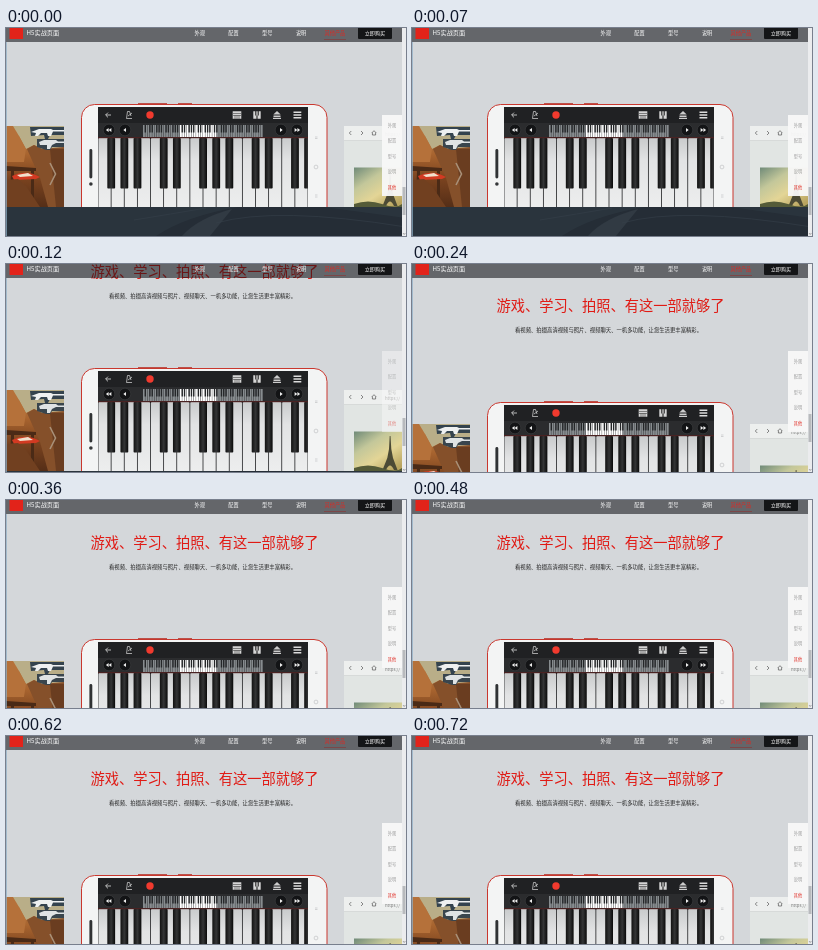
These frames come from a looping animation (400 by 208 pixels, 840 ms). An HTML page:

```html
<!DOCTYPE html>
<html>
<head>
<meta charset="utf-8">
<title>H5</title>
<style>
  html, body { margin: 0; width: 100%; height: 100%; overflow: hidden; background: #d4d7da; }
  svg { display: block; width: 100vw; height: 100vh; }
  text { font-family: "Noto Sans CJK SC", "Noto Sans CJK", "Noto Sans CJK JP", sans-serif; }
  .page, .copy, .thumb, .menu { animation: .84s step-end infinite; }
  .page { animation-name: scroll; }
  .copy { animation-name: appear; }
  .thumb { animation-name: thumb; }
  .menu { animation-name: fade; }
  @keyframes scroll {
    0% { transform: translateY(0); }
    14.286% { transform: translateY(28px); }
    28.571% { transform: translateY(62px); }
    42.857%, 100% { transform: translateY(63px); }
  }
  @keyframes appear {
    0% { opacity: 0; }
    14.286%, 100% { opacity: 1; }
  }
  @keyframes thumb {
    0% { transform: translateY(9px); }
    14.286% { transform: translateY(4px); }
    28.571%, 100% { transform: translateY(0); }
  }
  @keyframes fade {
    0% { opacity: .95; }
    14.286% { opacity: .5; }
    28.571%, 100% { opacity: .95; }
  }
</style>
</head>
<body>
<svg viewBox="0 0 400 208" preserveAspectRatio="none">
  <defs>
    <linearGradient id="town" x2="0" y2="1">
      <stop stop-color="#b98a55"/><stop offset=".35" stop-color="#a8642f"/>
      <stop offset=".65" stop-color="#7a431f"/><stop offset="1" stop-color="#552e17"/>
    </linearGradient>
    <linearGradient id="sky" x2=".8" y2="1">
      <stop stop-color="#6f8a78"/><stop offset=".35" stop-color="#c3c79a"/>
      <stop offset=".65" stop-color="#e3d596"/><stop offset="1" stop-color="#b9a45f"/>
    </linearGradient>
    <linearGradient id="ivory" x2="0" y2="1">
      <stop stop-color="#c9cbcc"/><stop offset=".3" stop-color="#e2e3e4"/><stop offset="1" stop-color="#eeefef"/>
    </linearGradient>
    <linearGradient id="ebony">
      <stop stop-color="#111"/><stop offset=".5" stop-color="#343536"/><stop offset="1" stop-color="#090909"/>
    </linearGradient>
    <clipPath id="screen"><rect x="92" y="79" width="210" height="100"/></clipPath>
  </defs>

  <rect width="400" height="208" fill="#d4d7da"/>

  <g class="page">
    <g class="copy">
      <text x="84.5" y="-14.7" font-size="14.25" fill="#e01a14">游戏、学习、拍照、有这一部就够了</text>
      <text x="103" y="6" font-size="5.35" fill="#222">看视频、拍摄高清视频与照片、视频聊天、一机多功能，让您生活更丰富精彩。</text>
    </g>

    <!-- game screenshot -->
    <g>
      <rect y="98" width="58" height="81" fill="url(#town)"/>
      <path d="M7 98H58V121H36L28 117 20 121 13 108 7 105Z" fill="#b9ae88"/>
      <path d="M0 98H7L13 108 20 121 18 134H0Z" fill="#b5713a"/>
      <path d="M21 121 28 117 36 121 58 119V179H42L34 150Z" fill="#85502a"/>
      <path d="M44 121H58V179H50Z" fill="#6a3d20"/>
      <path d="M0 138 30 140V143H0ZM5 143H8V172H4ZM25 143H28V179H25Z" fill="#4a2a16"/>
      <path d="M6 148Q20 141 34 149L30 151 8 152Z" fill="#d23a22"/>
      <path d="M11 147 22 145 27 148 14 149Z" fill="#f0e0cc"/>
      <path d="M0 152 12 151 20 158 34 179H0Z" fill="#714020"/>
      <path d="M24 99H58V107H44L42 111H39L38 107 25 108Z" fill="#34434e"/>
      <path d="M25 104 33 101H45L47 102H58V103.5H47L45 108H42L41 105H35L32 108H29L30 105Z" fill="#eef0f0"/>
      <path d="M31 111H58V119H46L44 122H40L31 119Z" fill="#39454d"/>
      <path d="M33 114 38 112H50L52 113.5H58V115H50L46 117 44 121H41V117H34Z" fill="#dfe3e4"/>
      <path d="M44 135 49.5 146 44 157" fill="none" stroke="#a89078" stroke-width="1.6"/>
    </g>

    <!-- browser screenshot -->
    <g>
      <rect x="338" y="98" width="58" height="81" fill="#e1e5e3"/>
      <rect x="338" y="98" width="58" height="14" fill="#edefee"/>
      <path d="M338 112.5H396" stroke="#d0d4d4" stroke-width=".6"/>
      <path d="M345.3 103 343.3 105 345.3 107M355 103 357 105 355 107M365.7 105 368 102.7 370.3 105M366.4 104.7V107H369.6V104.7" fill="none" stroke="#555" stroke-width=".7"/>
      <text x="379" y="107.5" font-size="4.3" fill="#777">https://</text>
      <rect x="348" y="139.5" width="48" height="40" fill="url(#sky)"/>
      <path d="M383.7 144H384.5L385.3 157 387 166 391.5 178H388Q384 169 380 178H376.5L381.3 166 383 157Z" fill="#4c4a35"/>
      <path d="M348 176Q362 171 376 176T396 176V179H348Z" fill="#555b38"/>
    </g>

    <!-- phone -->
    <rect x="75.5" y="76.5" width="245.5" height="130" rx="13" fill="#f3f4f4" stroke="#c9372e"/>
    <path d="M132 75.7H161M172 75.7H186" stroke="#b73128"/>
    <rect x="83.4" y="121" width="2.9" height="29.5" rx="1.4" fill="#303234"/>
    <circle cx="84.9" cy="156" r="1.8" fill="#343638"/>
    <g fill="none" stroke="#b9bbbc" stroke-width=".6">
      <path d="M309 109H311.5M309 110.5H311.5M309 167H311.5M309 169H311.5"/><circle cx="310" cy="139" r="1.9"/>
    </g>

    <g clip-path="url(#screen)">
      <rect x="92" y="79" width="210" height="100" fill="#202123"/>
      <rect x="92" y="95" width="210" height="14" fill="#2b2c2e"/>
      <g fill="none" stroke="#ddd" stroke-width=".8">
        <path d="M105 87H99.8M102 84.6 99.6 87 102 89.4"/>
        <path d="M121.5 83.5H123.5L125 88M121.5 83.5 120.5 90.5H126M122 88 126 85" stroke-width=".7"/>
        <path d="M287.5 84.2H295.3M287.5 87H295.3M287.5 89.8H295.3" stroke-width="1.4"/>
      </g>
      <path d="M267.3 86.5 271 83 274.7 86.5ZM267.5 87.5H274.5V89H267.5ZM267 89.8H275V91H267Z" fill="#ccc"/>
      <circle cx="144" cy="87" r="3.7" fill="#f13a2e"/>
      <path d="M226.7 83.3H235.3V90.7H226.7ZM247.3 83.3H254.7V90.7H247.3Z" fill="#d5d5d5"/>
      <path d="M227 85.5H235M227 87.5H235M229 87V91M231 87V91M233 87V91" stroke="#444" stroke-width=".6"/>
      <path d="M249.8 83V87.5M252.2 83V87.5M251 87.5V91" stroke="#222" stroke-width="1.1"/>
      <g id="buttons"></g>
      <g id="overview"></g>
      <g id="keys"></g>
      <rect x="92" y="109" width="210" height="1.2" fill="#4a2222"/>
    </g>

    <!-- next section -->
    <g>
      <rect y="179" width="400" height="62" fill="#2a343d"/>
      <path d="M150 208Q180 188 232 179H318L400 190V208Z" fill="#252d36"/>
      <path d="M176 208Q192 190 226 181L204 208Z" fill="#313a43"/>
      <path d="M128 192Q165 186 200 180M210 195Q270 178 400 199" fill="none" stroke="#37414a" stroke-width=".6"/>
    </g>
  </g>

  <rect width="400" height="14" fill="#14161a" opacity=".58"/>
  <rect x="3.5" width="13.5" height="11" fill="#e2231a"/>
  <text x="20.5" y="7.3" font-size="6.2" font-weight="500" fill="#fff">H5实战页面</text>
  <g id="nav" font-size="5.2" font-weight="500" fill="#fff"></g>
  <path d="M318 11.5H340" stroke="#8e3331" stroke-width=".6"/>
  <rect x="352" y="-2" width="34" height="13" rx="1" fill="#141517"/>
  <text x="358.7" y="7" font-size="5.1" font-weight="500" fill="#fff">立即购买</text>

  <g class="menu">
    <rect x="376" y="87" width="20" height="81" fill="#f8f8f8"/>
    <g id="side" font-size="4.2" fill="#999"></g>
  </g>

  <rect x="396" width="4" height="208" fill="#ebecee"/>
  <rect class="thumb" x="396.5" y="150" width="3" height="28" fill="#b8babd"/>
  <path d="M397 205 398.2 206.5 399.4 205" fill="none" stroke="#777" stroke-width=".6"/>
  <path d="M.4 14V208" stroke="#8fb0c8" stroke-width=".8"/>
</svg>
<script>
  const fill = (id, markup) => { document.getElementById(id).innerHTML = markup; };
  const times = (n, draw) => Array.from({ length: n }, (_, i) => draw(i)).join('');
  const rect = (x, y, w, h, color, extra = '') =>
    `<rect x="${x}" y="${y}" width="${w}" height="${h}" fill="${color}" ${extra}/>`;
  const label = (x, y, text, color = '') =>
    `<text x="${x}" y="${y}" ${color && `fill="${color}"`}>${text}</text>`;

  // White keys that have a black key on their right, counted from C.
  const hasSharp = i => [0, 1, 3, 4, 5].includes(i % 7);

  const pitch = 210 / 16;
  fill('keys',
    times(16, i => rect(92.4 + i * pitch, 110, pitch - .8, 75, 'url(#ivory)', 'rx="1"')) +
    times(16, i => hasSharp(i + 3)
      ? rect(92 + (i + 1) * pitch - 3.8, 110, 7.8, 50.5, 'url(#ebony)', 'rx=".8"') : ''));

  const small = 120 / 52;
  fill('overview',
    times(52, i => {
      const x = 137 + i * small;
      return rect(x, 97, small - .35, 12, x > 173 && x < 210 ? '#fff' : '#878c8f');
    }) +
    times(51, i => hasSharp(i + 5)
      ? rect(137 + (i + 1) * small - .7, 97, 1.4, 7.5, '#242628') : ''));

  const arrow = (x, dir) => `<path d="M${x + dir * 1.7} 102 ${x - dir} 100V104Z" fill="#eee"/>`;
  const button = (x, dir, twice) =>
    `<circle cx="${x}" cy="102" r="5.8" fill="#131416" stroke="#3d3f41" stroke-width=".6"/>` +
    (twice ? arrow(x - 1.4, dir) + arrow(x + 1.4, dir) : arrow(x, dir));
  fill('buttons', button(103, -1, true) + button(119, -1) + button(275, 1) + button(291, 1, true));

  const names = ['外观', '配置', '型号', '说明'];
  fill('nav', names.map((name, i) => label(188.5 + i * 33.8, 7, name)).join('') +
    label(318.5, 7, '其他产品', '#d92a24'));
  fill('side', [...names, '其他'].map((name, i) =>
    label(381.7, 98.6 + i * 15.6, name, i === 4 ? '#e2231a' : '')).join(''));
</script>
</body>
</html>
```
